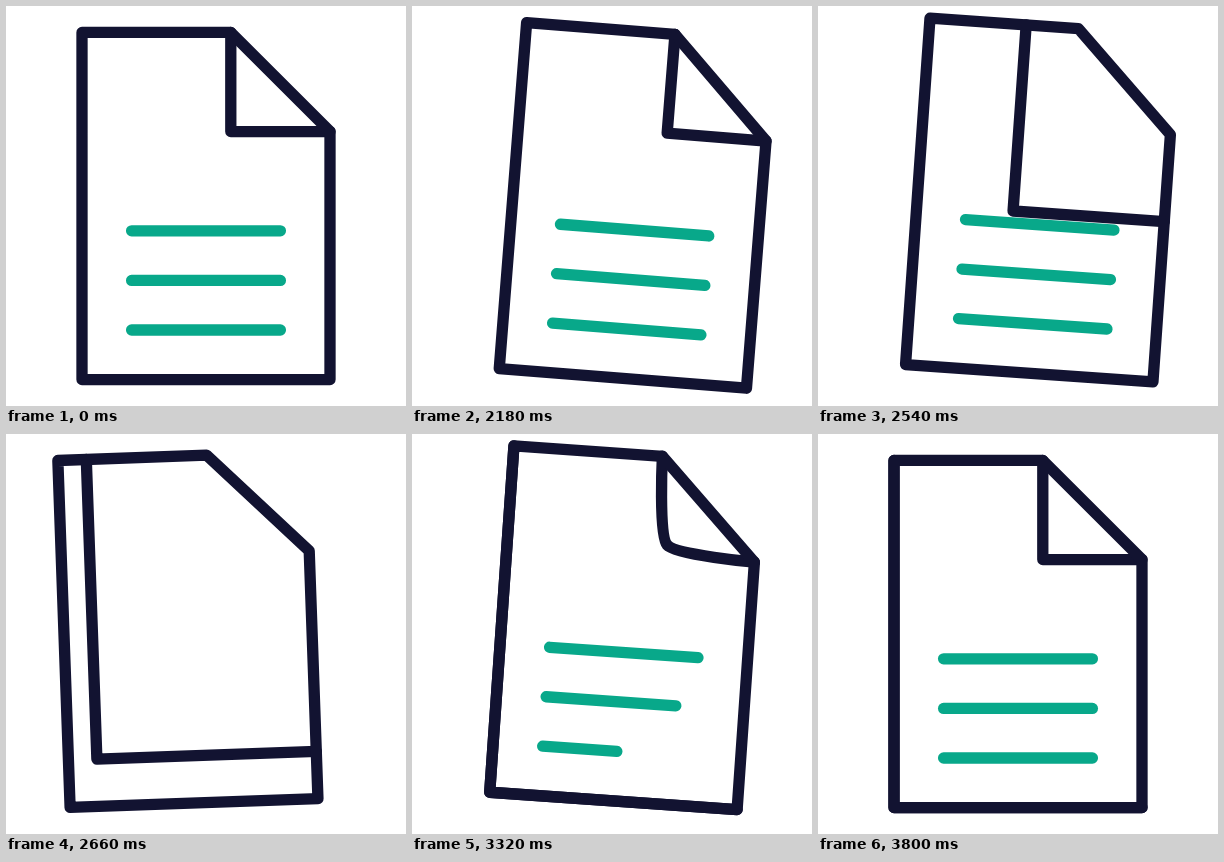
An HTML page for the animation above (3830 ms loop, 400x400 px).

```html
<!DOCTYPE html>
<html lang="en">
<head>
<meta charset="utf-8">
<title>Document page turn</title>
<style>
  html, body { margin: 0; width: 100%; height: 100%; overflow: hidden; background: #fff; }
  svg { display: block; width: 100vw; height: 100vh; }
  path { fill: none; stroke: #121331; stroke-width: 11.3; stroke-linecap: round; stroke-linejoin: round; }
  .text path { stroke: #08a88a; }
  #cover { fill: #fff; stroke: none; }
</style>
</head>
<body>
<svg viewBox="0 0 400 400">
  <g id="sheet">
    <g class="text"><path d="M125.6 224.8H274.4M125.6 274.4H274.4M125.6 324H274.4"/></g>
    <path id="cover"/>
    <path id="peel"/>
    <g class="text" id="fresh"><path/><path/><path/></g>
    <path id="fold"/>
    <path d="M224.8 26.4H76V373.6H324V125.6Z"/>
  </g>
</svg>
<script>
const LOOP = 3830, REST = 2030, STEP = 30;
const $ = id => document.getElementById(id);
const sheet = $('sheet'), cover = $('cover'), peel = $('peel'), fold = $('fold');
const lines = [...$('fresh').children];

// Keys are [step, value] pairs, eased between neighbours.
const sway = [[0, 0], [13, 55.5], [25.5, -35.5], [31, -35], [46, 16], [60, 0]];
const lift = [[0, 0], [12, -1.2], [17, -6], [36, 3.3], [46, -7.4], [60, 0]];
const tilt = [[0, 0], [12, 9.05], [29, -8.5], [47, 5], [60, 0]];
const lineSpans = [[24, 39], [30, 48], [35, 53]];

function ease(n, from, to) {
  const p = Math.min(1, Math.max(0, (n - from) / (to - from)));
  return p * p * (3 - 2 * p);
}

function track(keys, n) {
  let value = keys[0][1];
  for (let i = 1; i < keys.length; i++) {
    value += (keys[i][1] - keys[i - 1][1]) * ease(n, keys[i - 1][0], keys[i][0]);
  }
  return value;
}

// The folded corner sweeps to the lower left and uncovers a blank page.
function drawPeel(n) {
  const k = ease(n, 13, 25.5);
  const x = 224.8 - 148.8 * k, y = 125.6 + 248 * k;
  const edge = `M${x} 26.4V${y}H324`;
  peel.setAttribute('d', edge);
  cover.setAttribute('d', edge + 'V125.6L224.8 26.4Z');
}

// A new corner bulges out of the diagonal and sharpens.
function drawFold(n) {
  const k = ease(n, 28, 51);
  const x = 274.4 - 49.6 * k, y = 76 + 49.6 * k, h = 42 * (1 - k);
  fold.setAttribute('d', n < 28 ? '' :
    `M224.8 26.4C224.8 26.4 ${x - h} ${y - h} ${x} ${y}C${x + h} ${y + h} 324 125.6 324 125.6`);
}

function drawLines(n) {
  lines.forEach((line, i) => {
    const k = ease(n, ...lineSpans[i]);
    line.setAttribute('d', k ? `M125.6 ${224.8 + 49.6 * i}h${148.8 * k}` : '');
  });
}

function draw() {
  const t = performance.now() % LOOP;
  const n = t < REST ? 0 : Math.floor((t - REST) / STEP) + 1;
  sheet.setAttribute('transform',
    `translate(${track(sway, n)} ${track(lift, n)}) rotate(${track(tilt, n)} 200 200)`);
  drawPeel(n);
  drawFold(n);
  drawLines(n);
  requestAnimationFrame(draw);
}
draw();
</script>
</body>
</html>
```
